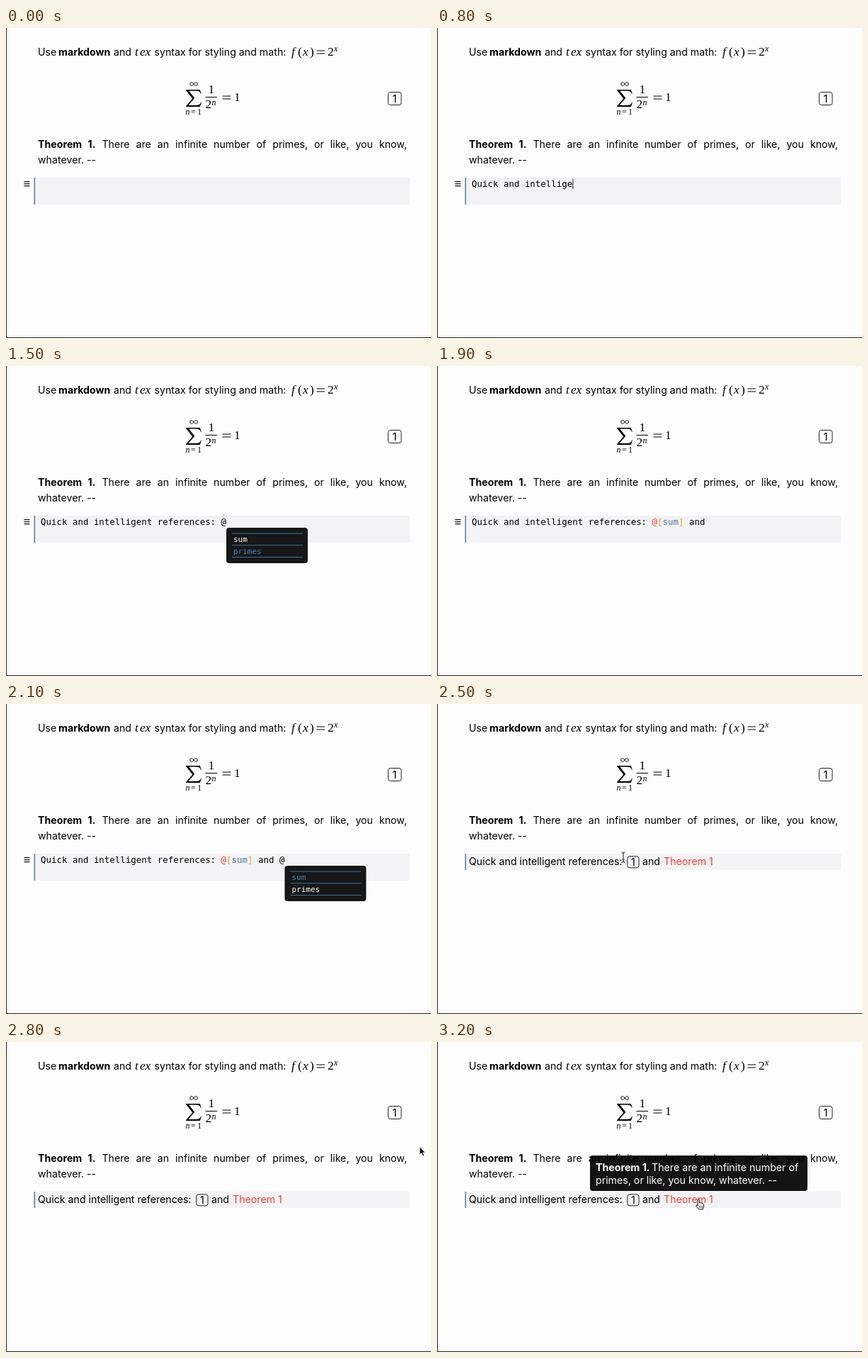
These frames come from a looping animation (600x437 px, 3800 ms). An HTML page:

```html
<!DOCTYPE html>
<html lang="en">
<head>
<meta charset="utf-8">
<title>Smart references</title>
<style>
  html, body { margin: 0; width: 600px; height: 437px; overflow: hidden; background: #fefdfe; }
  body { position: relative; color: #000; }
  svg { position: absolute; left: 0; top: 0; }
  svg, p { font: 14.2px Inter, "Open Sans", sans-serif; }
  p { position: absolute; margin: 0; left: 45px; top: 153px; width: 521px;
      line-height: 22px; white-space: nowrap; text-align: justify; text-align-last: justify; }
  p { white-space: normal; }
  text { fill: currentColor; white-space: pre; }
  b, .bold { font-weight: 700; }
  .math { font: 17.5px "Liberation Serif", "Noto Serif", serif; }
  .it { font-style: italic; }
  .small { font-size: 12px; }
  .code { font: 12.45px "DejaVu Sans Mono", monospace; }
  .menu { font: 11px "DejaVu Sans Mono", monospace; }
  .tip { color: #fff; }
  .dark { fill: #000; fill-opacity: .92; }
  .box { fill: none; stroke: #222; }
</style>
</head>
<body>
<p><b>Theorem 1.</b> There are an infinite number of primes, or like, you know,</p>
<svg width="600" height="437" viewBox="0 0 600 437">
  <defs>
    <g id="sum">
      <path fill="currentColor" d="M254 87h19.8l2 5.8h-.9c-1-3.3-3-4.2-8-4.2h-8.8l8.2 10.2-8.9 10.2h9.6c5 0 7-1 8-4.3h.9l-2 6.3H254v-.8l9.3-10.8L254 87.8z"/>
      <path fill="none" stroke="currentColor" d="M265 79c-2-3.2-5.2-3.3-5.2 0s3.2 3.2 5.2 0 5.2-3.2 5.2 0-3.2 3.2-5.2 0"/>
      <g class="math">
        <text class="small" x="253.5 261 270" y="122"><tspan class="it">n</tspan>=1</text>
        <text x="285.5" y="92">1</text>
        <text x="281.5" y="113">2</text>
        <text class="it small" x="290.5" y="108.5">n</text>
        <text x="322" y="103">1</text>
      </g>
      <path stroke="currentColor" d="M281.5 97.5H298M305.5 96H317.5M305.5 100H317.5"/>
    </g>
  </defs>

  <path d="M.5 0V436.5H600" fill="none" stroke="#222"/>

  <text x="45" y="38.5">Use</text>
  <text x="74" y="38.5" class="bold">markdown</text>
  <text x="152" y="38.5">and</text>
  <text x="182 189 196.5" y="38.5" class="math it">tex</text>
  <text x="209.5" y="38.5">syntax for styling and math:</text>
  <g class="math">
    <text x="403 412 419 429" y="39"><tspan class="it">f</tspan>(<tspan class="it">x</tspan>)</text>
    <path d="M438.5 32H450M438.5 36H450" stroke="#000"/>
    <text x="454" y="39">2</text>
    <text x="463" y="33" class="it small">x</text>
  </g>
  <use href="#sum"/>
  <rect class="box" x="539.5" y="90.5" width="18.5" height="18" rx="3"/>
  <text x="545.5" y="104.7" font-size="15">1</text>
  <text x="45" y="190.5">whatever. --</text>

  <rect id="cell" x="40" y="211" width="530" height="38" fill="#f3f2f4"/>
  <rect id="bar" x="39.5" y="211" width="1.6" height="38" fill="#5580a4"/>

  <g id="editor">
    <path d="M25.5 216.7h8M25.5 219.7h8M25.5 222.7h8" stroke="#111" stroke-width="1.2"/>
    <text id="typed" class="code" x="49" y="224"></text>
    <path id="caret" d="M0 212.5V227" stroke="#222"/>
    <g id="popup" class="menu">
      <rect x="311" y="228" width="115" height="50" rx="4" fill="#17171a"/>
      <path d="M319 236h100M319 252.7h100M319 269.5h100" stroke="#426f8c"/>
      <text id="optSum" x="321" y="248">sum</text>
      <text id="optPrimes" x="321" y="265">primes</text>
    </g>
  </g>

  <g id="rendered">
    <text x="45" y="227">Quick and intelligent references:</text>
    <rect class="box" x="268.8" y="214.8" width="16.2" height="16" rx="3"/>
    <text x="274" y="227.5">1</text>
    <text x="290" y="227">and</text>
    <text x="320" y="227" color="#e5403a">Theorem 1</text>
  </g>

  <g id="sumTip" class="tip">
    <rect class="dark" x="178" y="115" width="198" height="95" rx="4"/>
    <use href="#sum" x="-15" y="63"/>
  </g>
  <g id="theoremTip" class="tip">
    <rect class="dark" x="216" y="160" width="307" height="50" rx="4"/>
    <text class="bold" x="224" y="182">Theorem 1.</text>
    <text x="303" y="182">There are an infinite number of</text>
    <text x="224" y="200">primes, or like, you know, whatever. --</text>
  </g>

  <g id="pointer">
    <g id="beam" fill="none">
      <path d="M-2.5-7Q0-7 0-5Q0-7 2.5-7M0-5.5V6M-2.5 7.5Q0 7.5 0 5.5Q0 7.5 2.5 7.5M-1.5 3h3" stroke="#222"/>
    </g>
    <path id="arrow" d="M0-.5V11l2.6-2.4 2 4.4 2-.9-2-4.2H8z" fill="#111" stroke="#fff" stroke-width=".8"/>
    <g id="hand" stroke="#111" stroke-linejoin="round" stroke-linecap="round">
      <path d="M-1.4 8.5V.8Q-1.4-.5-.3-.5T.9.8V5Q2.2 4 3 5.2 4.4 4.4 5.1 5.8 7 5.4 7 7.5V10Q7 12 5.6 14H.1Q-1 12-3.4 9.5-4 7.5-2.5 7.6z" fill="#fff"/>
      <path d="M1 9v3M3 9v3M5 9v3" stroke-width=".7"/>
    </g>
  </g>
</svg>
<script>
const LOOP = 3800, STEP = 100, CHAR = 7.495;
const SOURCE = "Quick and intelligent references: @[sum] and @[primes]";
// Characters typed after each step, starting at step 5
const COUNTS = [4, 9, 14, 19, 22, 24, 27, 31, 34, 34, 35, 40, 41, 42, 44, 46, 46, 54];
const RENDER = 23;

const $ = id => document.getElementById(id);
const show = (id, on) => $(id).style.display = on ? "" : "none";
const between = (n, a, b) => n >= a && n <= b;

const paint = (color, s) => `<tspan fill="${color}">${s}</tspan>`;
const highlight = s => s.replace(/@\[(\w+)\]/g, (_, name) =>
  paint("#e0403c", "@") + paint("#dfa02e", "[") + paint("#44789f", name) + paint("#dfa02e", "]"));

function drawEditor(n) {
  const count = n < 5 ? 0 : COUNTS[Math.min(n - 5, COUNTS.length - 1)];
  $("typed").innerHTML = highlight(SOURCE.slice(0, count));
  show("caret", between(n, 5, 14) || between(n, 16, 18));
  $("caret").setAttribute("transform", `translate(${49.5 + count * CHAR})`);

  const second = between(n, 20, 21);
  show("popup", n === 15 || second);
  $("popup").setAttribute("transform", `translate(${second ? 11 * CHAR : 0})`);
  $("optSum").style.color = n === 21 ? "#4a80a9" : "#fff";
  $("optPrimes").style.color = n === 21 ? "#fff" : "#4a80a9";
}

function pointerAt(n) {
  if (n < 26) return [263 - 13 * (25 - n), 216 - 10 * (25 - n)];
  if (n < 28) return [277, 222];
  const ease = 1 - (1 - Math.min((n - 28) / 4, 1)) ** 2;
  return [584 - 214.5 * ease, 148 + 74 * ease];
}

function draw(n) {
  const done = n >= RENDER;
  show("editor", !done);
  show("rendered", done);
  for (const id of ["cell", "bar"]) $(id).setAttribute("height", done ? 23 : 38);
  if (!done) drawEditor(n);

  const onSum = between(n, 26, 27), onTheorem = n >= 32;
  show("sumTip", onSum);
  show("theoremTip", onTheorem);
  show("pointer", n >= 24);
  show("beam", n < 26);
  show("hand", onSum || onTheorem);
  show("arrow", between(n, 28, 31));
  $("pointer").setAttribute("transform", `translate(${pointerAt(n)})`);
}

const start = performance.now();
let last = -1;
function tick() {
  const n = Math.floor((performance.now() - start) % LOOP / STEP);
  if (n !== last) draw(last = n);
  requestAnimationFrame(tick);
}
tick();
</script>
</body>
</html>
```
